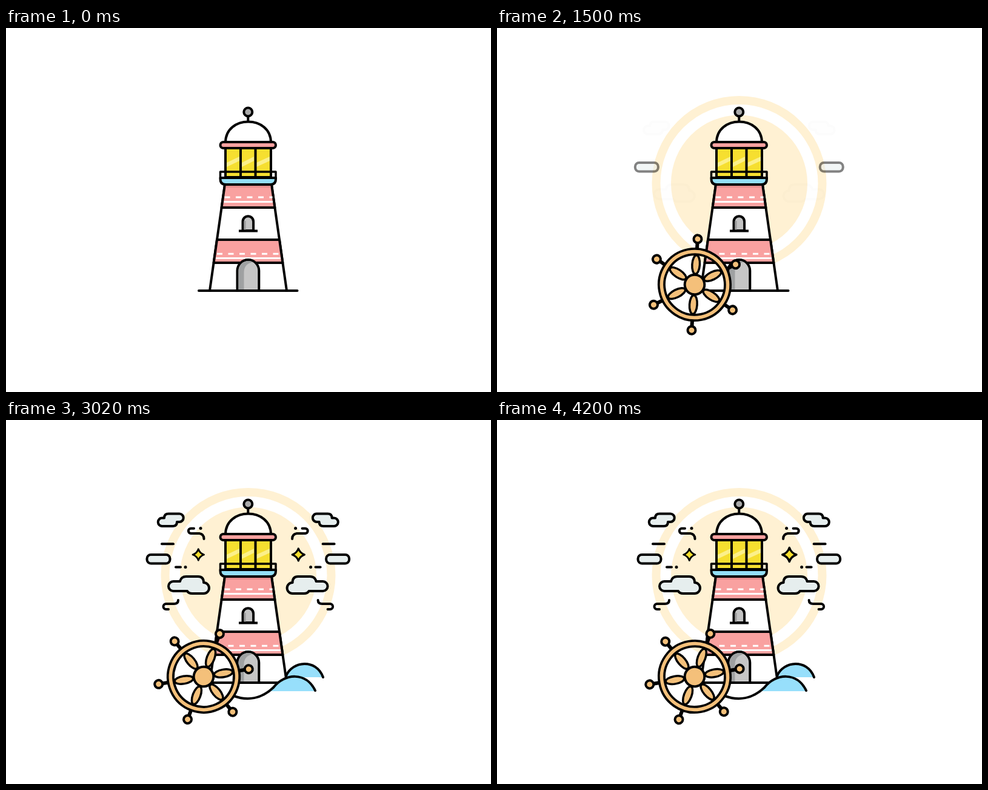
Write an HTML page that moves like this. It is 800 by 600 pixels and loops after 4220 ms.

```html
<!DOCTYPE html>
<html lang="en">
<head>
<meta charset="utf-8">
<title>Lighthouse</title>
<style>
  html, body { margin: 0; width: 100%; height: 100%; overflow: hidden; background: #fff; }
  svg { display: block; width: 800px; height: 600px; }
  .ink { stroke: #000; stroke-width: 4; stroke-linecap: round; stroke-linejoin: round; fill: none; }
  .pink { fill: #f9a1a0; }
  .shade { fill: #e6908f; }
  .blue { fill: #97dffb; }
  .tan { fill: #f4c07a; }
  .cloud { fill: #e6eeee; }
  .dot { fill: #000; stroke: none; }
  .trim { stroke: #fff; stroke-width: 3; }
</style>
</head>
<body>
<svg viewBox="0 0 800 600">
  <g id="glow" fill="#fff1d3">
    <circle r="112.5"/>
    <circle r="137" fill="none" stroke="#fff1d3" stroke-width="14"/>
  </g>

  <g id="sky" class="ink">
    <rect id="pill" class="cloud" x="232.5" y="222" width="38" height="14.5" rx="6.5"/>
    <g id="clouds" class="cloud">
      <path d="M257.5 175a6.5 6.5 0 0 1 0-13.5h3.5q0-7 7-7h18a6.5 6.5 0 0 1 0 13.5h-4q0 7-7 7z"/>
      <path d="M276 282a8 8 0 0 1 0-16h11q2-8 10-8h20q9 0 9 10a9 9 0 0 1 0 18h-19q-6 0-8-4z"/>
    </g>
    <g id="gusts">
      <path d="M257 204.3h19M284 297q0 6-7 6h-13a4.5 4.5 0 0 0 0 9h4"/>
    </g>
    <g id="wisps">
      <path d="M310 178.7h-5a4 4 0 0 0 0 8.3h14q7.500 1 7.500 9M280 242.500h8"/>
      <circle class="dot" cx="321" cy="178.500" r="2.500"/>
      <circle class="dot" cx="296" cy="242.500" r="2.500"/>
    </g>
  </g>
  <use href="#sky" transform="translate(798.6 0) scale(-1 1)"/>

  <g id="lighthouse" class="ink">
    <path d="M399.300 146v8"/>
    <circle cx="399.300" cy="138.500" r="7" fill="#aaa"/>
    <path d="M362 189C362 143 437 143 437 189z" fill="#fff"/>
    <path d="M362 198h75v48h-75z" fill="#f6df30"/>
    <path d="M364 222l21-10v7l-21 10zM389 222l20-10v7l-20 10zM413 222l22-10v7l-22 10z"
      fill="#fcf08a" stroke="none"/>
    <path d="M387 198v48M411.500 198v48M362 198v48M437 198v48"/>
    <rect class="pink" x="353.500" y="188" width="91.500" height="10" rx="5"/>

    <path d="M361 258h77l25 175H336z" fill="#fff"/>
    <path class="pink" d="M361 258h77l5.400 38h-87.800zM348 349h103l5.400 38H342.600z"/>
    <path class="shade" stroke="none" d="M363 260h73l.5 3h-74z"/>
    <path class="trim" stroke-linecap="butt" d="M359.500 286.500h80.500M346 379.500h107"/>
    <path class="trim" stroke-linecap="butt" stroke-dasharray="9 9.500" d="M360.500 279h79M348 372.300h103"/>

    <path d="M390.500 334v-15a8.800 8.800 0 0 1 17.600 0v15z" fill="#c3c3c3"/>
    <path d="M394 333v-15" stroke="#9b9b9b" stroke-width="3" stroke-linecap="butt"/>
    <path d="M386 334.500h27" stroke-linecap="square"/>
    <path d="M381.500 433v-33a17.900 17.900 0 0 1 35.800 0v33z" fill="#c6c6c6"/>
    <path d="M383.500 431v-31q1-14 16-16q6 0 7 2q-14 3-14 17v28z" fill="#9fa1a2" stroke="none"/>

    <path d="M353.500 247H445v2q0 9-9 9h-73.500q-9 0-9-9z" fill="#93dff7"/>
    <path d="M353.500 247v-10H445v10" stroke-width="3.500"/>
    <path d="M318 433h162.500"/>
  </g>

  <g id="waves" class="ink">
    <path class="blue" stroke="none" d="M462 424C472 397 512 393 523 424z"/>
    <path d="M462 422C472 397 512 393 523 424"/>
    <path class="blue" stroke="none" d="M434 447l7-6C460 417 495 415 510 447z"/>
    <path d="M376 455C398 463 421 460 441 441C460 417 495 415 510 446"/>
  </g>

  <g class="ink" stroke-linejoin="miter">
    <path id="starL" d="M0-10Q2.500-2.500 10 0Q2.500 2.500 0 10Q-2.500 2.500-10 0Q-2.500-2.500 0-10z"
      fill="#f9e02e" stroke-width="3"/>
    <use id="starR" href="#starShape"/>
  </g>

  <g id="wheel" class="ink">
    <g id="spokes"></g>
    <circle r="54.500" stroke-width="13"/>
    <circle r="54.500" stroke="#f4c07a" stroke-width="5.500"/>
    <circle class="tan" r="16.300"/>
  </g>
</svg>

<script>
const LOOP = 4220;
const $ = id => document.getElementById(id);
const place = (id, x, y, scale = 1, turn = 0) =>
  $(id).setAttribute('transform', `translate(${x} ${y}) rotate(${turn}) scale(${scale})`);
const fade = (id, amount) => $(id).setAttribute('opacity', amount);

// Smooth 0..1 progress over a span of time
function ease(t, start, length) {
  const u = Math.min(1, Math.max(0, (t - start) / length));
  return u * u * (3 - 2 * u);
}

const rightStar = $('starL').cloneNode();
rightStar.id = 'starR';
$('starR').replaceWith(rightStar);

for (let a = 0; a < 360; a += 60) {
  $('spokes').innerHTML += `<g transform="rotate(${a})">
    <path d="M60 0h9" stroke-width="6" stroke-linecap="butt"/>
    <circle class="tan" cx="75.300" r="6.500"/>
    <ellipse class="tan" cx="33" rx="15.500" ry="6.300" stroke-width="3.500"/>
  </g>`;
}

function slideIn(id, t, start) {
  const p = ease(t, start, 440);
  place(id, -9 * (1 - p), 0);
  fade(id, p);
}

function twinkle(id, x, t, start, speed, phase) {
  const radius = 11.5 + 2.4 * Math.sin(phase + speed * t);
  place(id, x, 222, ease(t, start, 280) * radius / 12);
}

function draw(t) {
  place('glow', 399.5, 256, ease(t, 180, 550));
  place('wheel', 326, 423, ease(t, 603, 520), 0.0505 * t - 42);
  slideIn('pill', t, 1285);
  slideIn('clouds', t, 1480);
  fade('gusts', ease(t, 1560, 440));
  fade('waves', ease(t, 1560, 440));
  fade('wisps', ease(t, 1810, 440));
  twinkle('starL', 317.3, t, 1900, 0.0081, -18.33);
  twinkle('starR', 482.3, t, 1720, 0.0065, -13.06);
}

const begin = performance.now();
function tick() {
  draw((performance.now() - begin) % LOOP);
  requestAnimationFrame(tick);
}
tick();
</script>
</body>
</html>
```
